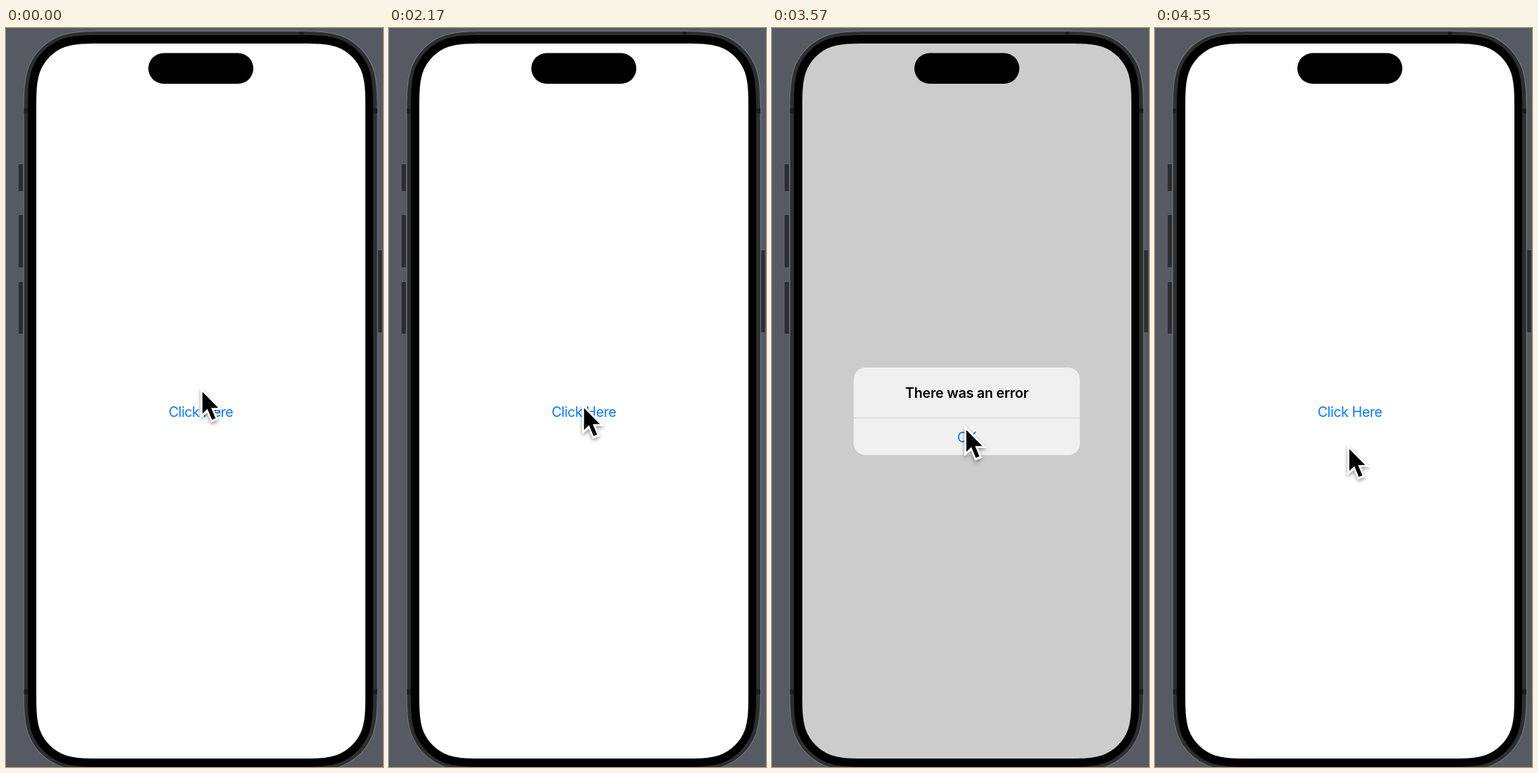
These frames come from a looping animation (535 px wide and 1047 px high, 4.62 s). An HTML page with a canvas:

```html
<!DOCTYPE html>
<html lang="en">
<head>
<meta charset="utf-8">
<title>Error alert</title>
<style>
  html, body { margin: 0; width: 100%; height: 100%; overflow: hidden; background: #565b63; }
  canvas { display: block; width: 535px; height: 1047px; }
</style>
</head>
<body>
<canvas id="stage" width="535" height="1047"></canvas>
<script>
const ctx = document.getElementById('stage').getContext('2d');
const LOOP = 4620, STEP = 70;
const BLUE = '#0a7af2';
const clamp = v => Math.min(1, Math.max(0, v));
const lerp = (a, b, u) => a + (b - a) * u;
const smooth = (t, from, to) => {
  const u = clamp((t - from) / (to - from));
  return u * u * (3 - 2 * u);
};

function rect(x, y, w, h, color) {
  ctx.fillStyle = color;
  ctx.fillRect(x, y, w, h);
}

function round(x, y, w, h, r, color) {
  ctx.fillStyle = color;
  ctx.beginPath();
  ctx.roundRect(x, y, w, h, r);
  ctx.fill();
}

// Rounded box with continuous-curvature corners
function squircle(x, y, w, h, r, color) {
  const corners = [[x, y], [x + w, y], [x + w, y + h], [x, y + h]];
  ctx.beginPath();
  corners.forEach(([cx, cy], i) => {
    ctx.save();
    ctx.translate(cx, cy);
    ctx.rotate(i * Math.PI / 2);
    ctx.scale(r, r);
    ctx.lineTo(0, 1.5287);
    ctx.bezierCurveTo(0, 1.0885, 0, 0.8684, 0.0749, 0.6315);
    ctx.bezierCurveTo(0.1691, 0.3728, 0.3728, 0.1691, 0.6315, 0.0749);
    ctx.bezierCurveTo(0.8684, 0, 1.0885, 0, 1.5287, 0);
    ctx.restore();
  });
  ctx.closePath();
  ctx.fillStyle = color;
  ctx.fill();
}

function label(text, y, color, weight, spacing) {
  ctx.font = `${weight} 19.6px Inter, "Open Sans", sans-serif`;
  ctx.letterSpacing = spacing + 'px';
  ctx.textAlign = 'center';
  ctx.fillStyle = color;
  ctx.fillText(text, 276.5, y);
}

function phone() {
  rect(0, 0, 535, 1047, '#565b63');
  for (const [x, y, w, h] of [[18, 193, 6, 38], [18, 265, 6, 74], [18, 360, 6, 73], [528, 315, 5.5, 116]]) {
    rect(x, y, w, h, '#2b2d2f');
  }
  squircle(24.5, 3.8, 503.5, 1049, 84, '#707274');
  squircle(25.7, 5, 501, 1047, 83, '#2c2e2f');
  for (const y of [114, 937]) {
    rect(25.5, y, 6, 7, '#1b1d1e');
    rect(521, y, 6, 7, '#1b1d1e');
  }
  rect(416, 5, 6, 6, '#1b1d1e');
  squircle(31, 10, 490, 1037, 77, '#000');
  squircle(43, 22, 467, 1013, 65, '#fff');
}

function alertLevel(t) {
  if (t < 2310) return 0;
  if (t < 2660) return 1 - 0.47 * Math.exp((2310 - t) / 95);
  return 1 - smooth(t, 4130, 4480);
}

function alertBox(t, level) {
  const size = t < 2660 ? 1 + 0.2 * (1 - level) : 1;
  ctx.save();
  ctx.globalAlpha = level;
  ctx.translate(276.5, 543);
  ctx.scale(size, size);
  ctx.translate(-276.5, -543);
  round(116, 481, 321, 124, 16.5, '#f0f0f0');
  rect(116, 552, 321, 1, '#d2d2d2');
  label('There was an error', 524.3, '#000', 600, -0.2);
  label('OK', 586.7, BLUE, 400, -0.4);
  ctx.restore();
}

// Button text fades while held down, then recovers
function buttonAlpha(t) {
  if (t < 1890 || t >= 2170) return 1;
  return t < 2030 ? 0.3 : lerp(0.3, 1, smooth(t, 1960, 2170));
}

function press(t, start, x, y) {
  const age = t - start;
  if (age < 0 || age >= 350) return;
  const grow = lerp(0.62, 1, smooth(age, 0, 140)) * lerp(1, 0.89, smooth(age, 210, 280));
  ctx.fillStyle = `rgba(253, 165, 28, ${0.36 * grow})`;
  ctx.beginPath();
  ctx.arc(x + 1, y + 5.3, 37 * grow, 0, Math.PI * 2);
  ctx.fill();
}

function pointerAt(t) {
  if (t >= 4550) return [273, 590];
  const a = smooth(t, 700, 1120), b = smooth(t, 3080, 3570), c = smooth(t, 3640, 3850);
  return [276 - 2 * a - b, 509 + 23 * a + 31 * b + 6 * c];
}

const poly = pts => new Path2D('M' + pts + 'Z');
const head = '8.2,20.9 8.2,4.9 19.8,16.5 13,16.5 12.6,16.6';
const outline = poly('8.2,4.9 19.8,16.5 15.2,16.5 17.3,21.6 13.7,23.1 11.6,18 8.2,20.9');
const arrow = poly('9.2,7.3 9.2,18.5 12.2,15.6 12.6,15.5 17.4,15.5');

function pointer(x, y) {
  ctx.save();
  ctx.translate(x, y);
  ctx.scale(2.75, 2.75);
  ctx.translate(-8.2, -4.9);
  ctx.fillStyle = '#fff';
  ctx.shadowColor = 'rgba(0, 0, 0, 0.4)';
  ctx.shadowBlur = 5;
  ctx.shadowOffsetY = 2.5;
  ctx.fill(outline);
  ctx.shadowColor = 'transparent';
  ctx.fill(poly(head));
  ctx.fillStyle = '#000';
  ctx.fill(arrow);
  ctx.transform(0.9221, -0.3871, 0.3871, 0.9221, -5.7605, 6.5909);
  ctx.fillRect(12.5, 13.6, 2, 8);
  ctx.restore();
}

function draw(t) {
  const level = alertLevel(t);
  const [x, y] = pointerAt(t);
  phone();
  ctx.globalAlpha = buttonAlpha(t);
  label('Click Here', 550.8, t >= 2310 && t < 4130 ? '#e3e3e3' : BLUE, 400, -0.4);
  ctx.globalAlpha = 1;
  if (level > 0) {
    squircle(43, 22, 467, 1013, 65, `rgba(0, 0, 0, ${0.2 * level})`);
    alertBox(t, level);
  }
  round(202, 35.5, 149, 43.5, 21.7, '#000');
  press(t, 1820, x, y);
  press(t, 3990, x, y);
  pointer(x, y);
}

const begin = performance.now();
function tick() {
  const t = (performance.now() - begin) % LOOP;
  draw(Math.floor(t / STEP) * STEP);
  requestAnimationFrame(tick);
}
tick();
</script>
</body>
</html>
```
